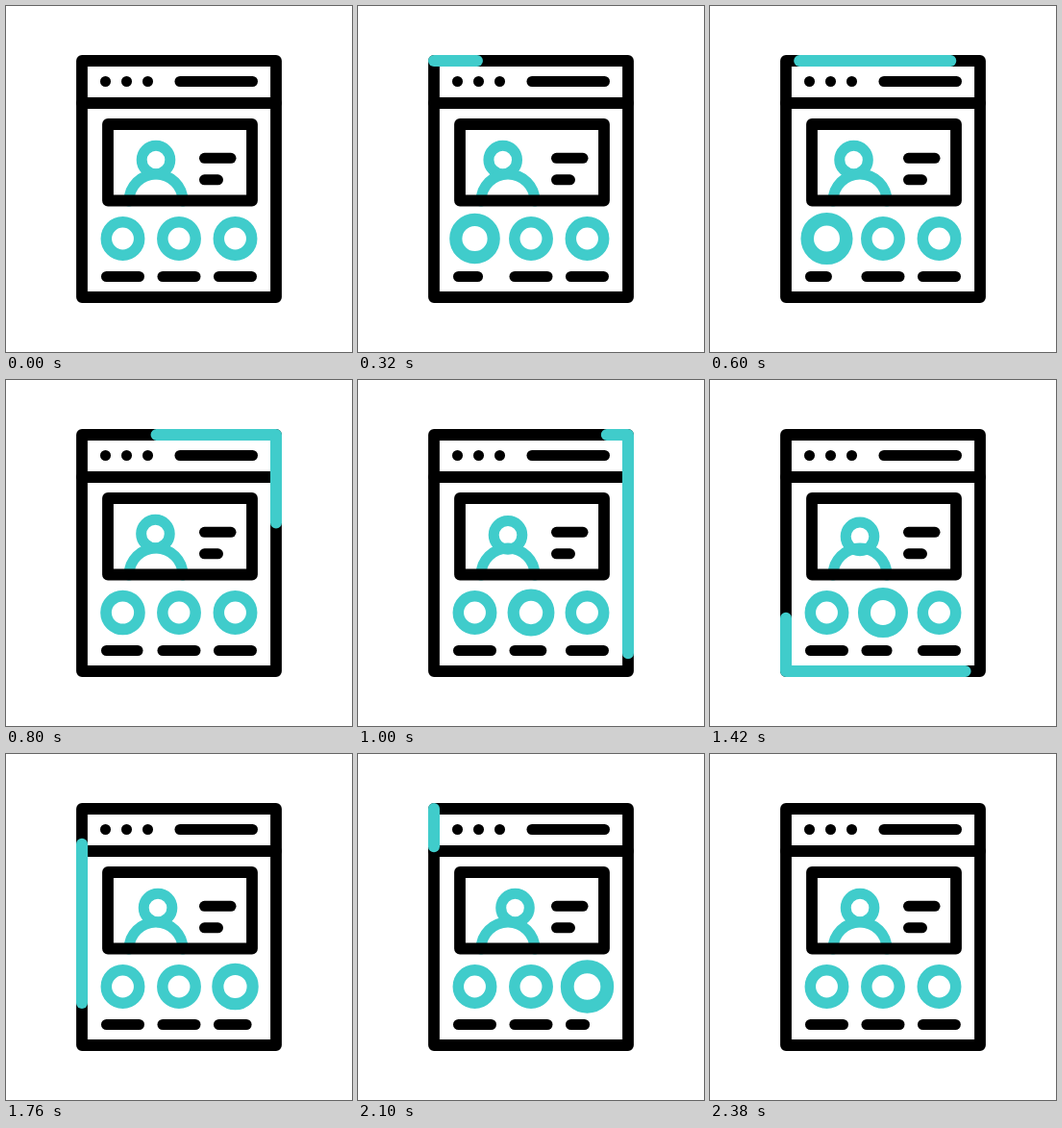
An HTML page with a canvas that plays this animation: 360x360 px, repeating every 2.4 s.

```html
<!DOCTYPE html>
<html lang="en">
<head>
<meta charset="utf-8">
<title>Web page icon</title>
<style>
  html, body { margin: 0; width: 100%; height: 100%; overflow: hidden; background: #fff; }
  canvas { display: block; width: 360px; height: 360px; }
</style>
</head>
<body>
<canvas id="stage"></canvas>
<script>
const LOOP = 2400;
const BLACK = '#000';
const TEAL = '#40cccb';
const STROKE = 11.5;
const PAGE = { x: 79, y: 57, w: 202, h: 246 };

const canvas = document.getElementById('stage');
const ratio = window.devicePixelRatio || 1;
canvas.width = canvas.height = 360 * ratio;
const ctx = canvas.getContext('2d');

const ease = (t, start, end) => {
  const u = Math.min(1, Math.max(0, (t - start) / (end - start)));
  return u * u * (3 - 2 * u);
};

// Three pulses follow each other, one per column.
const pulse = (t, index) => {
  const start = 100 + 770 * index;
  const peak = start + 380;
  return ease(t, start, peak) - ease(t, peak, peak + 380);
};

function stroke(color, width = STROKE) {
  ctx.strokeStyle = color;
  ctx.lineWidth = width;
  ctx.stroke();
}

function line(x1, x2, y, width = 11) {
  ctx.beginPath();
  ctx.moveTo(x1, y);
  ctx.lineTo(x2, y);
  stroke(BLACK, width);
}

function box(x, y, w, h) {
  ctx.beginPath();
  ctx.rect(x, y, w, h);
  stroke(BLACK, 11.8);
}

function ring(x, y, radius, width = STROKE) {
  ctx.beginPath();
  ctx.arc(x, y, radius, 0, Math.PI * 2);
  stroke(TEAL, width);
}

// Clockwise part of the page outline, as distances from its top left corner.
function outlinePart(from, to) {
  const { x, y, w, h } = PAGE;
  const corners = [[0, x, y], [w, x + w, y], [w + h, x + w, y + h],
    [2 * w + h, x, y + h], [2 * (w + h), x, y]];
  ctx.beginPath();
  for (let i = 0; i < 4; i++) {
    const [d1, x1, y1] = corners[i];
    const [d2, x2, y2] = corners[i + 1];
    const a = Math.max(from, d1), b = Math.min(to, d2);
    if (a >= b) continue;
    const point = d => [x1 + (x2 - x1) * (d - d1) / (d2 - d1),
      y1 + (y2 - y1) * (d - d1) / (d2 - d1)];
    if (a === from) ctx.moveTo(...point(a));
    ctx.lineTo(...point(b));
  }
  stroke(TEAL, 12);
}

function draw(t) {
  ctx.setTransform(ratio, 0, 0, ratio, 0, 0);
  ctx.fillStyle = '#fff';
  ctx.fillRect(0, 0, 360, 360);
  ctx.lineCap = ctx.lineJoin = 'round';

  const pulses = [0, 1, 2].map(i => pulse(t, i));

  // Portrait
  ring(156 + 8.5 * (pulses[2] - pulses[0]), 160 + 5 * pulses[1], 14.8, 11);
  ctx.beginPath();
  ctx.arc(156, 203, 28, Math.PI, 0);
  stroke(TEAL, 11);

  // Page, header and banner
  box(PAGE.x, PAGE.y, PAGE.w, PAGE.h);
  line(79, 281, 101, 11.8);
  for (const x of [103.5, 125.5, 147.5]) line(x, x + 0.01, 78.5);
  line(181, 256.5, 78.5);
  box(106, 123, 150, 79.5);
  line(206.5, 234, 158.3);
  line(206.5, 220.5, 180.8);

  // Columns
  pulses.forEach((p, i) => {
    const x = 121.5 + 58.5 * i;
    const scale = 1 + 0.235 * p;
    ring(x, 242, 17.2 * scale, STROKE * scale);
    line(x - 17, x + 17 - 22.5 * p, 281.5);
  });

  const length = 2 * (PAGE.w + PAGE.h);
  const head = length * ease(t, 58, 1998);
  const tail = length * ease(t, 461, 2338);
  if (head - tail > 0.05) outlinePart(tail, head);
}

function tick() {
  draw(performance.now() % LOOP);
  requestAnimationFrame(tick);
}
tick();
</script>
</body>
</html>
```
